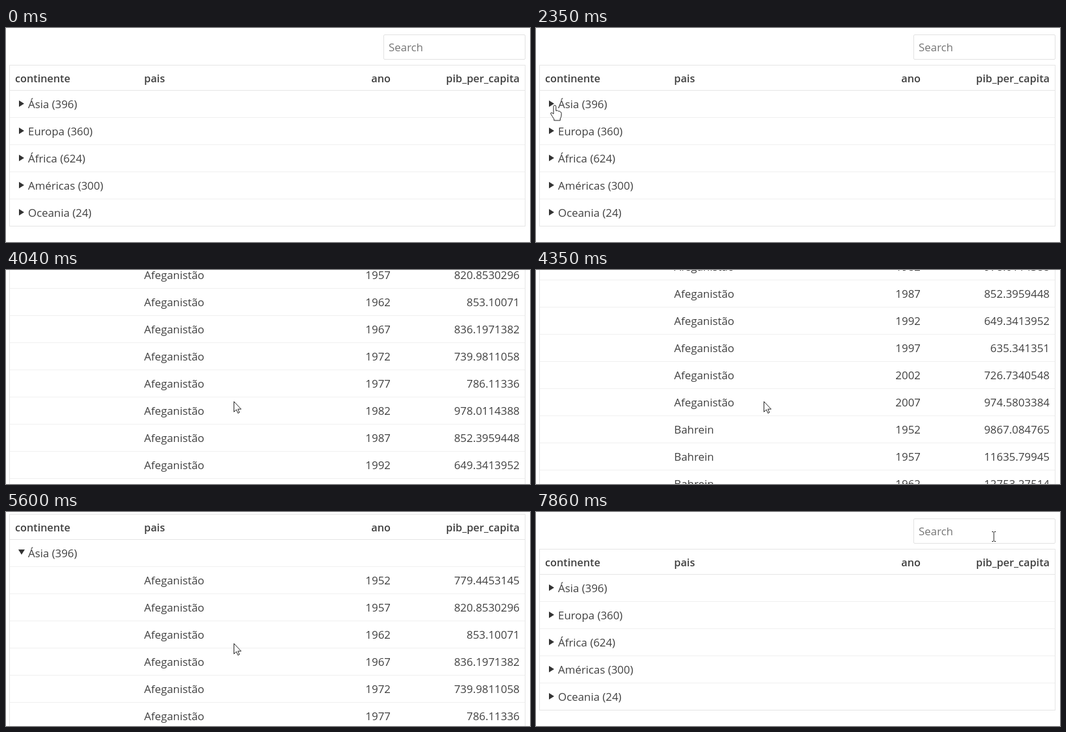
These frames come from a looping animation (808x331 px, 8 s). An HTML page:

```html
<!DOCTYPE html>
<html lang="pt">
<head>
<meta charset="utf-8">
<style>
  html, body { margin: 0; width: 100%; height: 100%; overflow: hidden; background: #fff; }
  body { position: relative; font: 16.9px "Open Sans", "Noto Sans", sans-serif; color: #404040; }
  div, span { box-sizing: border-box; white-space: nowrap; }
  #page { position: absolute; left: 0; top: 0; width: 808px; }
  #search { position: absolute; left: 582px; top: 10px; width: 219px; height: 39px; padding-left: 7px;
    border: 1px solid #e2e2e2; border-radius: 2px; line-height: 37px; color: #757575; }
  #table { position: absolute; left: 5px; top: 57px; width: 796px; border: 1px solid #e5e5e5; }
  .row { position: relative; height: 42px; line-height: 41px; border-bottom: 1px solid #f0f0f0; }
  .row:last-child { height: 41px; border: 0; }
  .head { height: 39px; line-height: 40px; border-color: #e5e5e5; font-size: 16.3px; font-weight: 600; }
  .row span { position: absolute; top: 0; }
  .group { left: 28px; }
  .head .group { left: 8px; }
  .country { left: 207px; }
  .year { right: 207px; }
  .gdp { right: 8px; }
  .arrow { position: absolute; left: 12px; top: 14px; width: 12px; height: 12px; overflow: visible; fill: #333; }
  #pointer { position: absolute; left: 0; top: 0; width: 808px; height: 331px; overflow: hidden; }
  #pointer path { stroke: #222; stroke-linejoin: round; fill: #fff; }
</style>
</head>
<body>
<div id="page">
  <div id="search">Search</div>
  <div id="table"></div>
</div>
<svg id="pointer">
  <g id="cursor">
    <path id="default" d="M.5.5V16.5L4.2 13L6.7 18.5L9 17.4L6.6 12.2H11.5Z"/>
    <path id="hand" d="M-2 1.5a1.9 1.9 0 0 1 3.8 0V8q3-1.2 3.5.7q2.6-.8 3 1.2q1.8-.3 1.8 1.6V15q0 3-1.8 5v3H-1.2v-2.2C-3 18-5 15-6.5 12.2q.8-2.8 4.5.8Z"/>
    <path id="text" d="M-3-7.5H-1L0-6.5L1-7.5H3M0-6.5V6.5M-3 7.5H-1L0 6.5L1 7.5H3"/>
  </g>
</svg>
<script>
const LOOP = 8000, TICK = 10, OPEN_AT = 2780, CLOSE_AT = 6870, SHOW_POINTER_AT = 760, TURN = 150;
const $ = id => document.getElementById(id);

const groups = ['Ásia (396)', 'Europa (360)', 'África (624)', 'Américas (300)', 'Oceania (24)'];
const countries = {
  'Afeganistão': '779.4453145 820.8530296 853.10071 836.1971382 739.9811058 786.11336 ' +
    '978.0114388 852.3959448 649.3413952 635.341351 726.7340548 974.5803384',
  'Bahrein': '9867.084765 11635.79945 12753.27514 14804.6727 18268.65839'
};

const cells = (country, year, gdp) =>
  `<span class="country">${country}</span><span class="year">${year}</span><span class="gdp">${gdp}</span>`;
const header = `<div class="row head"><span class="group">continente</span>${cells('pais', 'ano', 'pib_per_capita')}</div>`;
const groupRows = groups.map(label =>
  `<div class="row"><svg class="arrow"><path d="M-4-5V5L4 0Z"/></svg><span class="group">${label}</span></div>`);
const detailRows = Object.entries(countries).flatMap(([name, values]) =>
  values.split(' ').map((gdp, i) => `<div class="row">${cells(name, 1952 + 5 * i, gdp)}</div>`));

// Eased progress from 0 to 1 between two times.
function glide(t, from, to) {
  const u = Math.min(1, Math.max(0, (t - from) / (to - from)));
  return u * u * (3 - 2 * u);
}

const scrollAt = t => 100 * (glide(t, 3480, 3650) - glide(t, 5520, 5690))
  + 400 * (glide(t, 3790, 4583) - glide(t, 4605, 5130));

const pointerMoves = [
  { from: 760, to: 1540, x: 75, y: 128, bend: 140 },
  { from: 1570, to: 2330, x: 29, y: 120 },
  { from: 2840, to: 3420, x: 351, y: 203 },
  { from: 6210, to: 6600, x: 37, y: 126, bend: 70 },
  { from: 6960, to: 7600, x: 659, y: 107 },
  { from: 7650, to: 7850, x: 706, y: 38 }
];

function pointerAt(t) {
  let x = 588, y = 232;
  for (const move of pointerMoves) {
    const u = glide(t, move.from, move.to);
    x += (move.x - x) * u;
    y += (move.y - y) * u - (move.bend || 0) * 4 * u * (1 - u);
  }
  return [Math.round(x), Math.round(y)];
}

function pointerKind(x, y, open) {
  if (x > 582 && y > 10 && y < 49) return 'text';
  const clickable = y > 97 && y < (open ? 139 : 306) && x < 205;
  return clickable ? 'hand' : 'default';
}

let shownOpen = null;
function showRows(open) {
  if (open === shownOpen) return;
  shownOpen = open;
  const rows = open ? [groupRows[0], ...detailRows] : groupRows;
  $('table').innerHTML = header + rows.join('');
  for (const path of document.querySelectorAll('.arrow path')) turnArrow(path, 0);
}

function turnArrow(path, turn) {
  path.setAttribute('transform', `translate(6 ${6 - turn}) rotate(${90 * turn})`);
}

function draw(t) {
  const open = t >= OPEN_AT && t < CLOSE_AT;
  showRows(open);
  turnArrow(document.querySelector('.arrow path'),
    glide(t, OPEN_AT, OPEN_AT + TURN) - glide(t, CLOSE_AT, CLOSE_AT + TURN));
  $('page').style.transform = `translateY(${-Math.round(scrollAt(t))}px)`;

  const [x, y] = pointerAt(t);
  const kind = pointerKind(x, y, open);
  $('pointer').style.display = t < SHOW_POINTER_AT ? 'none' : '';
  $('cursor').setAttribute('transform', `translate(${x} ${y})`);
  for (const shape of $('cursor').children) shape.style.display = shape.id === kind ? '' : 'none';
}

const start = performance.now();
function frame() {
  const elapsed = (performance.now() - start) % LOOP;
  draw(Math.floor(elapsed / TICK) * TICK);
  requestAnimationFrame(frame);
}
frame();
</script>
</body>
</html>
```
